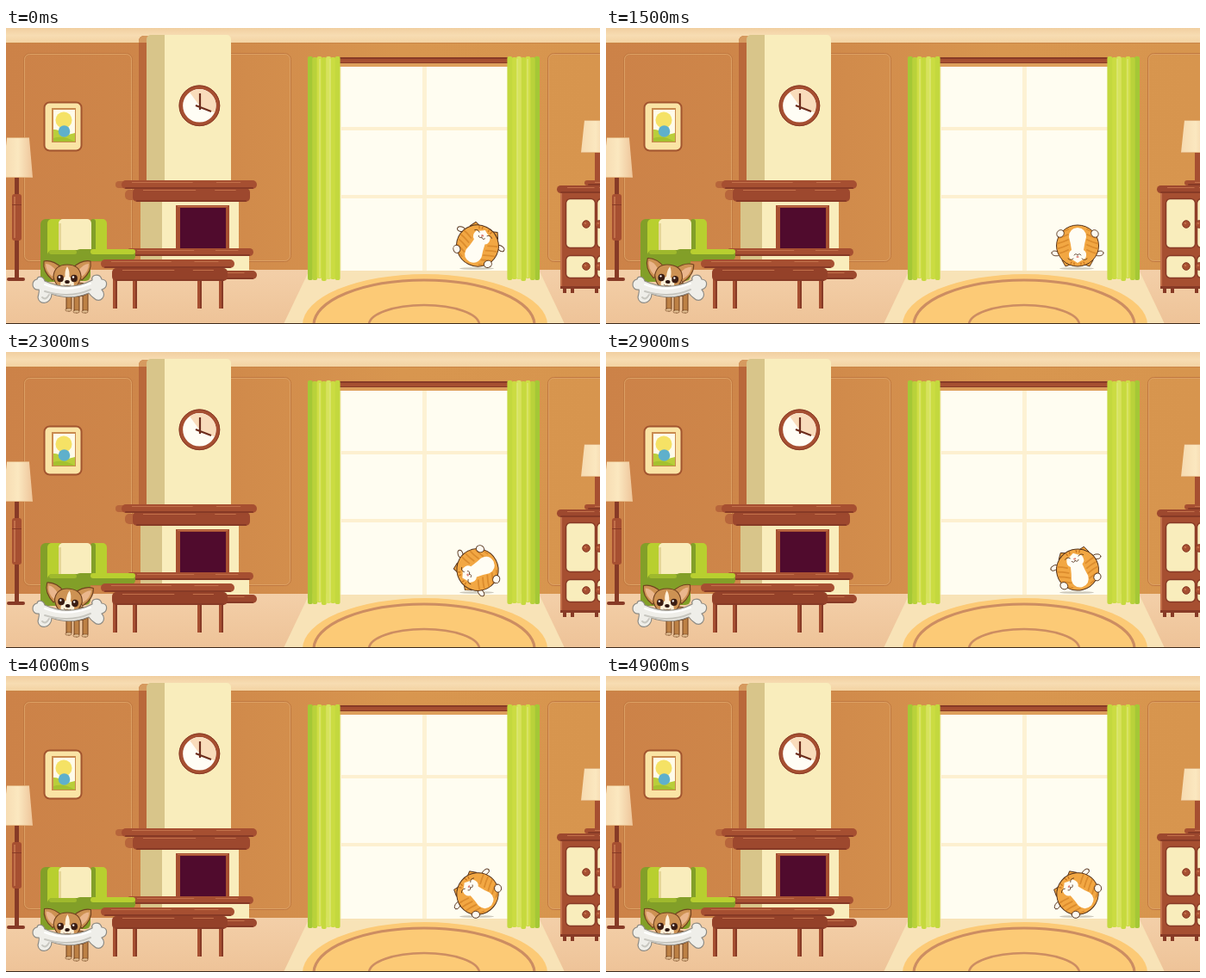
An HTML page with a canvas for the animation above (5000 ms loop, 689 by 344 pixels).

```html
<!DOCTYPE html>
<html lang="en">
<head>
<meta charset="utf-8">
<title>Living room</title>
<style>
html, body { margin: 0; width: 100%; height: 100%; overflow: hidden; background: #f0c9a0; }
canvas { display: block; width: 689px; height: 344px; }
</style>
</head>
<body>
<canvas id="stage" width="689" height="344"></canvas>
<script>
const W = 689, H = 344, LOOP = 5000, STEP = 100;
const stage = document.getElementById('stage').getContext('2d');
const room = document.createElement('canvas');
room.width = W;
room.height = H;
let g = room.getContext('2d');

const WOOD = '#a64f31', DARK = '#873a26', LIGHT = '#c2704a', CREAM = '#f9edbc', SHADE = '#d8c58a';

function paint(fill, line, width = 1) {
  if (fill) { g.fillStyle = fill; g.fill(); }
  if (line) { g.strokeStyle = line; g.lineWidth = width; g.stroke(); }
}
function rect(x, y, w, h, fill) {
  g.fillStyle = fill;
  g.fillRect(x, y, w, h);
}
function round(x, y, w, h, r, fill, line, width) {
  g.beginPath();
  g.roundRect(x, y, w, h, r);
  paint(fill, line, width);
}
function oval(x, y, rx, ry, fill, line, width, turn = 0) {
  g.beginPath();
  g.ellipse(x, y, rx, ry, turn, 0, Math.PI * 2);
  paint(fill, line, width);
}
const dot = (x, y, r, fill, line, width) => oval(x, y, r, r, fill, line, width);
function poly(points, fill, line, width) {
  g.beginPath();
  for (let i = 0; i < points.length; i += 2) g.lineTo(points[i], points[i + 1]);
  g.closePath();
  paint(fill, line, width);
}
function path(d, fill, line, width) {
  const p = new Path2D(d);
  if (fill) { g.fillStyle = fill; g.fill(p); }
  if (line) { g.strokeStyle = line; g.lineWidth = width || 1; g.stroke(p); }
}
function blend(x0, y0, x1, y1, ...colors) {
  const b = g.createLinearGradient(x0, y0, x1, y1);
  colors.forEach((c, i) => b.addColorStop(i / (colors.length - 1), c));
  return b;
}
// Draws a half once as is and once flipped
function mirror(draw) {
  for (const side of [-1, 1]) {
    g.save();
    g.scale(side, 1);
    draw();
    g.restore();
  }
}
// Wooden board with a lit upper edge and a dark lower edge
function board(x, y, w, h, fill = WOOD) {
  round(x, y, w, h, 5, fill);
  round(x + 4, y + h - 2, w - 8, 2, 1, DARK);
  rect(x + 12, y + 2, w * 0.45, 1, LIGHT);
  rect(x + w * 0.7, y + 2, w * 0.18, 1, LIGHT);
}

function drawWall() {
  rect(0, 0, W, 18, blend(0, 0, 0, 17, '#f1cfa0', '#f7dcb2', '#f3d3a3'));
  rect(0, 17, W, 264, blend(0, 0, W, 0, '#cc8248', '#cf884a', '#d8964f', '#d7954e'));
  rect(0, 17, W, 1, '#c98546');
  for (const [x, w] of [[20, 126], [200, 130], [628, 90]]) {
    round(x + 0.5, 29.5, w, 242, 7, null, '#c07840', 1);
    round(x + 1.5, 30.5, w - 2, 240, 6, null, '#dca064', 1);
  }
  rect(0, 281, W, 63, blend(0, 281, 0, H, '#f3cfa8', '#eec398'));
}

function drawRug() {
  poly([352, 281, 618, 281, 648, H, 322, H], '#f8e3b7');
  oval(486, 345, 142, 59, '#fcca76');
  oval(485, 345, 128, 52, null, '#cc8d62', 3.2);
  oval(485, 345, 64, 23, null, '#cc8d62', 2.6);
}

// dir 1 has the darker folds on the left, -1 on the right
function drawCurtain(x, dir) {
  const folds = ['#a4c836', '#b9d23a', '#cfdd45', '#c6d93e', '#d6e35c', '#cbdc42', '#c3d83e'];
  const w = 37 / folds.length;
  g.save();
  g.translate(x + 18.5, 0);
  g.scale(dir, 1);
  folds.forEach((c, i) => round(i * w - 18.5, 33 + (i % 2), w + 0.6, 260 - (i % 3), 2, c));
  for (const fold of [-5, 7]) rect(fold, 36, 1, 254, '#e0e985');
  g.restore();
}

function drawWindow() {
  rect(386, 40, 198, 6, '#dd9f5c');
  rect(387, 45, 196, 237, '#fffdf1');
  rect(483, 45, 5, 237, '#fdf2d4');
  rect(387, 115, 196, 4, '#fdf0d0');
  rect(387, 194, 196, 4, '#fdf0d0');
  rect(387, 45, 2, 237, '#fdf2d4');
  rect(385, 34, 200, 7, WOOD);
  rect(385, 34, 200, 2, DARK);
  rect(385, 40, 200, 1, DARK);
  drawCurtain(350, 1);
  drawCurtain(582, -1);
}

function drawFireplace() {
  round(154, 9, 14, 172, [6, 0, 0, 0], '#b9683a');
  round(154, 9, 14, 8, [6, 0, 0, 0], '#d69a5f');
  round(163, 8, 30, 171, [5, 0, 0, 0], SHADE);
  round(184, 8, 77, 171, [0, 5, 0, 0], CREAM);
  rect(156, 200, 26, 82, SHADE);
  rect(181, 200, 89, 82, CREAM);
  rect(181, 264, 101, 18, CREAM);
  rect(197, 206, 62, 51, WOOD);
  rect(199, 207, 58, 1, LIGHT);
  rect(202, 209, 53, 48, '#500b2d');
  round(127, 178, 30, 8, 4, '#b7653b');
  round(138, 188, 30, 12, 5, '#b7653b');
  board(147, 186, 136, 16, '#9d482e');
  board(134, 177, 157, 10);
  board(140, 256, 147, 9);
  board(170, 282, 121, 10, '#9d482e');
}

function drawClock() {
  dot(224.4, 90.3, 21.5, '#fffdf5', WOOD, 4.5);
  g.beginPath();
  g.moveTo(224.4, 90.3);
  g.arc(224.4, 90.3, 19, -2.2, 0.45);
  g.closePath();
  paint('#f9dcbb');
  dot(224.4, 90.3, 23.4, null, DARK, 1);
  path('M225 76V95M220 90L238 97', null, '#6d2c1c', 2.2);
}

function drawPicture() {
  round(44.5, 86.5, 43, 56, 6, '#fae4a5', '#a2552f', 2);
  rect(53, 93, 28, 40, '#c98b4f');
  rect(55, 95, 25, 37, '#fffbe9');
  dot(67, 107, 9.5, '#f5e265');
  path('M55 132V118Q62 117 68 125L80 122V132Z', '#b9ce3a');
  dot(67.5, 120, 6.8, '#5fb0cb');
  path('M55 132V128Q66 124 80 132Z', '#a4c12f');
}

function drawLamps() {
  const cloth = x => blend(x, 0, x + 34, 0, '#f6dab0', '#fbe8c0', '#eec59a');
  rect(10, 172, 5, 120, DARK);
  round(7, 193, 11, 54, 3, WOOD);
  rect(9, 196, 2, 48, LIGHT);
  rect(7, 205, 11, 1, DARK);
  round(1, 290, 21, 4, 2, DARK);
  poly([1, 128, 27, 128, 31, 174, -4, 174], cloth(-3));
  rect(1, 127, 26, 1, '#e0af79');
  rect(-2, 173, 33, 1, '#e5b886');

  rect(683, 144, 6, 34, WOOD);
  board(671, 177, 30, 6);
  poly([671, 107, 710, 107, 714, 145, 667, 145], cloth(667));
  rect(671, 107, 18, 1, '#e0af79');
  rect(667, 144, 22, 1, '#e5b886');
}

function drawCabinet() {
  for (const x of [646, 655, 683]) rect(x, 300, 4, 8, DARK);
  rect(643, 191, 46, 112, WOOD);
  rect(643, 191, 2, 112, LIGHT);
  rect(643, 300, 46, 3, DARK);
  board(639, 183, 70, 9, '#9d482e');
  for (const x of [649, 685]) {
    round(x + 0.5, 198.5, 34, 57, 5, CREAM, DARK, 1.5);
    round(x + 0.5, 264.5, 34, 26, 5, CREAM, DARK, 1.5);
  }
  for (const x of [673, 688]) {
    for (const y of [228, 277]) {
      dot(x, y, 4.3, WOOD, DARK, 1);
      dot(x - 1, y - 1, 1.3, LIGHT);
    }
  }
}

function drawChair() {
  const leaf = '#b8cf2f', moss = '#829f28';
  round(40, 222, 24, 73, [6, 2, 2, 2], moss);
  round(48, 222, 18, 44, 5, leaf);
  round(98, 222, 19, 44, 5, leaf);
  round(98, 222, 6, 44, 3, moss);
  round(61, 222, 38, 48, [5, 5, 0, 0], CREAM);
  rect(61, 227, 3, 33, '#e6d69a');
  round(80, 257, 70, 14, 6, moss);
  round(98, 257, 52, 6, 3, leaf);
  round(48, 258, 50, 36, 6, moss);
  round(50, 258, 32, 5, 3, '#9fb92d');
}

function drawTable() {
  for (const x of [124, 147, 222, 247]) {
    rect(x, 290, 5, 36, WOOD);
    rect(x + 3, 290, 2, 36, DARK);
  }
  board(123, 279, 134, 15, '#944129');
  board(110, 269, 155, 10);
}

function drawDog(tilt) {
  const line = '#70411f', tan = '#cd9253', coat = '#bd8145';
  for (const [x, y] of [[70, 329], [79, 331], [89, 331]]) {
    round(x, 304, 6, y - 304, 3, coat, line, 1);
    round(x - 1, y - 3, 7, 3, 1.5, '#e5c194', line, 0.6);
  }
  oval(84, 304, 13, 8, coat, line, 1);

  g.save();
  g.translate(71, 300);
  g.rotate(tilt * Math.PI / 180);
  mirror(() => {
    path('M6 -21Q17 -31 27 -29Q29 -17 17 -7Z', tan, line, 1.1);
    path('M13 -18Q19 -26 25 -26Q25 -17 17 -11Z', '#eab68c');
  });
  path('M-16 -11Q-15 -25 0 -25Q15 -25 16 -11Q13 3 0 5Q-13 3 -16 -11Z', tan, line, 1.1);
  path('M0 -23Q3 -18 2.5 -11Q10 -6 7 1Q0 5 -7 1Q-10 -6 -2.5 -11Q-3 -18 0 -23Z', '#fff0d8');
  mirror(() => oval(8, -9, 3.9, 4.2, '#3b1d13'));
  for (const x of [-8, 8]) dot(x - 1, -10.5, 1.2, '#fff');
  oval(0, -5, 2.8, 2, '#2e1712');
  path('M-4 -1Q-2 1 0 -1Q2 1 4 -1', null, line, 0.8);
  g.restore();

  path('M45 294Q73 307 100 293C98 286 109 285 111 292C119 293 118 302 111 304' +
    'C118 311 109 321 102 314Q99 312 96 308Q74 317 53 309C53 321 38 323 37 313' +
    'C38 308 39 305 38 304C29 305 29 293 36 292C37 288 43 288 45 294Z', '#efeee9', '#8e8b84', 1.2);
  path('M45 306Q74 315 98 304M42 313Q46 317 50 310', null, '#c8c7c0', 2);
  path('M45 298Q70 308 98 297', null, '#fff', 2);
}

function drawCat(turn) {
  const line = '#54331c';
  oval(546, 279.5, 20, 1.3, 'rgba(90,80,65,.3)');
  g.save();
  g.translate(547, 253);
  g.rotate(turn * Math.PI / 180);
  mirror(() => {
    oval(25.5, -9, 4.6, 2.8, '#fffaf0', line, 0.9, 0.2);
    path('M8 -22L14 -24L18 -17Z', '#eda03c', line, 0.9);
  });
  oval(0, 0, 24.5, 24, '#f2a743', line, 1);
  g.save();
  g.beginPath();
  g.ellipse(0, 0, 24, 23, 0, 0, Math.PI * 2);
  g.clip();
  mirror(() => {
    for (let y = -7; y < 23; y += 6) path(`M25 ${y - 3}Q17 ${y - 1} 11 ${y + 2}`, null, '#dc8c2d', 1.8);
    path('M4 -24V-20M9 -23L7 -19', null, '#c9751f', 1.3);
  });
  g.restore();
  path('M0 -20Q4 -17 9 -15Q12 -8 7 -5Q8 3 10 10Q10 20 0 21Q-10 20 -10 10Q-8 3 -7 -5Q-12 -8 -9 -15Q-4 -17 0 -20Z', '#fffdf4');
  mirror(() => path('M5 -15Q8 -18 11 -15M0 -11Q2 -8 4 -11', null, line, 0.8));
  oval(0, -13, 1.6, 1.1, '#df8175');
  mirror(() => oval(20, 14, 4.6, 4, '#fffaf0', line, 0.9, -0.8));
  g.restore();
}

drawWall();
drawRug();
drawWindow();
drawFireplace();
drawClock();
drawPicture();
drawLamps();
drawCabinet();
drawChair();
drawTable();
rect(0, 343, W, 1, '#3c2a1c');

// Both animals move in held poses over one nine-step cycle
const roll = [26, 0, -15, -32, -50, -118, -180, -237, -270];
const nod = [0, -1, -1, 0, 1, 7, 8, 8, 4];

g = stage;
g.lineJoin = 'round';
g.lineCap = 'round';
function frame(now) {
  const pose = Math.floor((now % LOOP) / STEP) % roll.length;
  g.drawImage(room, 0, 0);
  drawDog(nod[pose]);
  drawCat(roll[pose]);
}

const start = performance.now();
function tick() {
  frame(performance.now() - start);
  requestAnimationFrame(tick);
}
tick();
</script>
</body>
</html>
```
